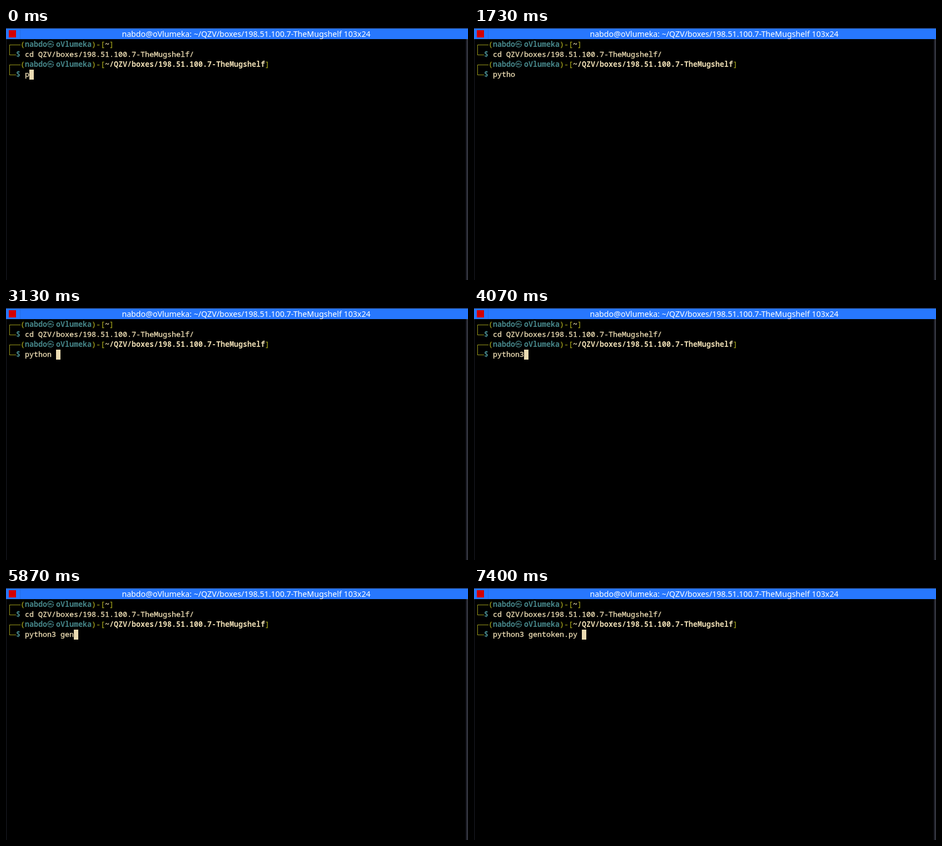
These frames come from a looping animation (831 by 454 pixels, 8 s). An HTML page:

```html
<!DOCTYPE html>
<html lang="en">
<head>
<meta charset="utf-8">
<title>Terminal</title>
<style>
  html, body { margin: 0; width: 100%; height: 100%; overflow: hidden; background: #000; }
  svg { display: block; }
  text {
    white-space: pre; color: #ebdbb2; fill: currentColor;
    font: 13.3333px "Noto Sans Mono", "DejaVu Sans Mono", monospace;
    stroke: currentColor; stroke-width: 0.35px;
  }
  .title { font: 14.2px "Noto Sans", "Open Sans", sans-serif; color: #fff; stroke: none; text-anchor: middle; }
  .frame { color: #98971a; }
  .user { color: #458588; font-weight: 700; stroke: none; }
  .mark { font-family: "Noto Sans CJK KR", "Noto Sans CJK JP", "Noto Sans CJK", sans-serif; font-size: 12.5px; }
  .path { font-weight: 700; stroke: none; }
  .line { fill: none; stroke: #98971a; stroke-width: 1; shape-rendering: crispEdges; }
</style>
</head>
<body>
<svg id="stage" width="831" height="454" viewBox="0 0 831 454">
  <rect width="831" height="454" fill="#1c1d27"/>
  <rect x="1" y="20" width="826" height="434" fill="#000"/>
  <rect x="829" y="20" width="2" height="434" fill="#34363f"/>
  <rect y="1" width="831" height="19" fill="#2777ff"/>
  <rect x="25" y="1" width="1" height="19" fill="#226be6"/>
  <rect x="5" y="4" width="13" height="13" fill="#d40000"/>
</svg>
<script>
const CELL = 8, ROW = 18, LEFT = 2, TOP = 21, LOOP = 8000;
const USER = "nabdo", HOST = "oVlumeka";
const DIR = "~/QZV/boxes/198.51.100.7-TheMugshelf";
const stage = document.getElementById("stage");

const colX = col => LEFT + col * CELL;
const rowY = row => TOP + row * ROW;

function add(tag, attrs, content = "") {
  const el = document.createElementNS("http://www.w3.org/2000/svg", tag);
  for (const key in attrs) el.setAttribute(key, attrs[key]);
  el.textContent = content;
  stage.appendChild(el);
  return el;
}

function put(row, col, content, cls = "") {
  return add("text", { x: colX(col), y: rowY(row) + 13, class: cls }, content);
}

function prompt(row, dir) {
  const y = rowY(row) + 9.5;
  add("path", { class: "line", d: `M26 ${y}H6.5V${y + ROW}H18` });
  put(row, 3, "(", "frame");
  put(row, 4, USER, "user");
  put(row, 9, "\u327F", "user mark");
  put(row, 11, HOST, "user");
  put(row, 19, ")-[", "frame");
  put(row, 22, dir, "path");
  put(row, 22 + dir.length, "]", "frame");
  put(row + 1, 2, "$", "user");
}

add("text", { x: 432, y: 16, class: "title" }, `${USER}@${HOST}: ${DIR} 103x24`);
prompt(0, "~");
put(1, 4, "cd " + DIR.slice(2) + "/");
prompt(2, DIR);

const input = put(3, 4, "");
const cursor = add("rect", { y: rowY(3), width: CELL, height: ROW, fill: "#ebdbb2" });

// [start ms, typed text, cursor shown]
const steps = [
  [0, "p", 1],
  [400, "py", 1],
  [800, "pyt", 1],
  [1000, "pyth", 1],
  [1200, "pytho", 1],
  [1730, "pytho", 0],
  [2330, "pytho", 1],
  [2400, "python", 1],
  [3000, "python", 0],
  [3130, "python ", 1],
  [3670, "python", 1],
  [4070, "python3", 1],
  [4600, "python3", 0],
  [4800, "python3 ", 1],
  [5330, "python3 g", 1],
  [5670, "python3 ge", 1],
  [5870, "python3 gen", 1],
  [6270, "python3 gentoken.py ", 1],
  [6800, "python3 gentoken.py ", 0],
  [7400, "python3 gentoken.py ", 1]
];

let shown = null;
function draw(now) {
  const t = now % LOOP;
  const step = steps.filter(s => s[0] <= t).pop();
  if (step === shown) return;
  shown = step;
  const [, typed, on] = step;
  input.textContent = typed;
  cursor.setAttribute("x", colX(4 + typed.length));
  cursor.setAttribute("visibility", on ? "visible" : "hidden");
}

const start = performance.now();
function tick() {
  draw(performance.now() - start);
  requestAnimationFrame(tick);
}
tick();
</script>
</body>
</html>
```
